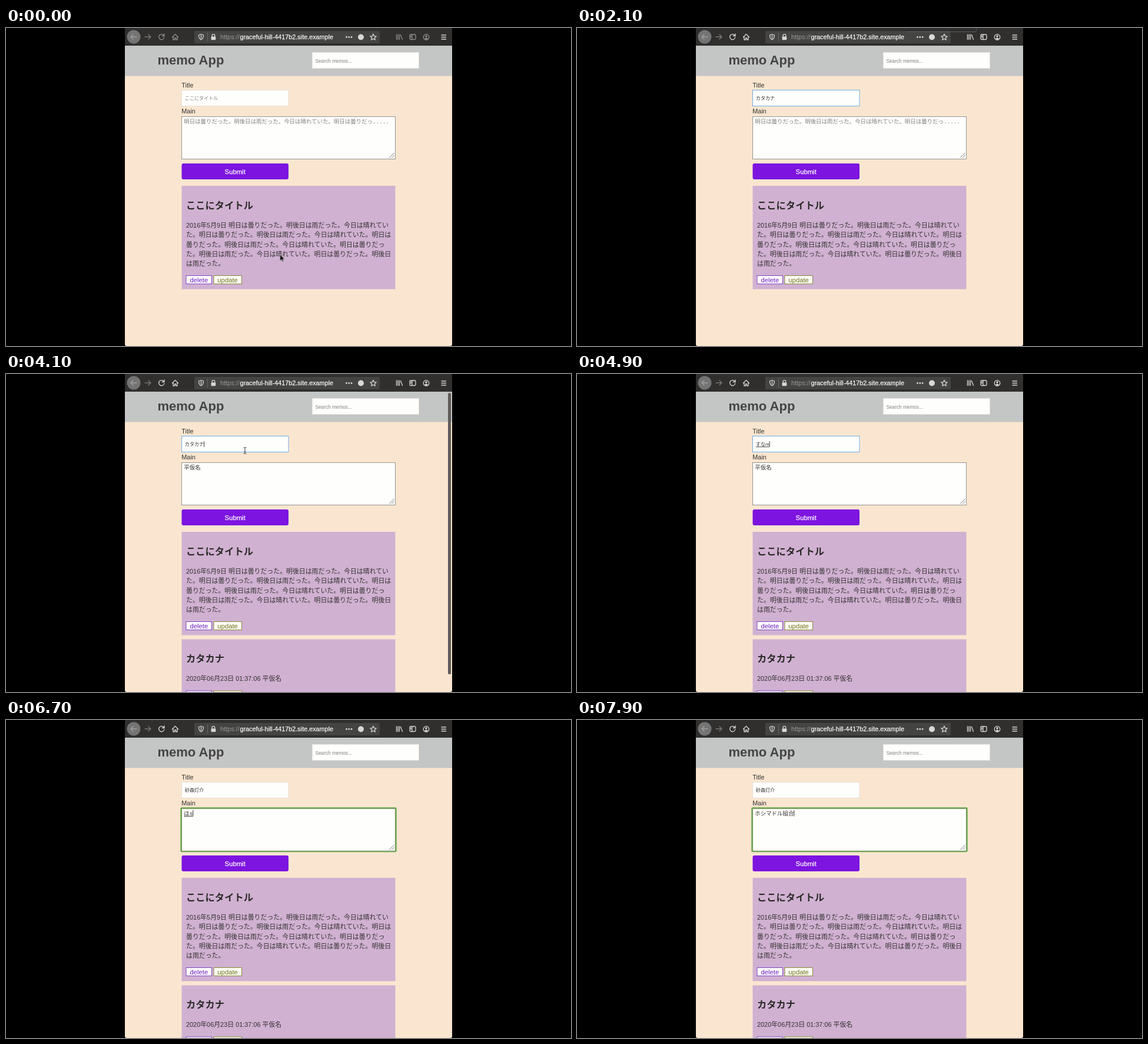
Recreate the animation shown at these times as an HTML page. Size 960x540 px, loop 8000 ms.

```html
<!DOCTYPE html>
<html lang="ja">
<head>
<meta charset="utf-8">
<title>memo App</title>
<style>
html, body { margin: 0; width: 100%; height: 100%; overflow: hidden; background: #000; }
svg { display: block; width: 960px; height: 540px; }
text { font-family: "Liberation Sans", "Noto Sans CJK JP", sans-serif; font-size: 10.9px; fill: #333130; white-space: pre; }
.bold { font-weight: 700; fill: #2c2a28; font-size: 16.3px; }
.small { font-size: 8.1px; }
.mono { font-family: "Liberation Mono", "Noto Sans CJK JP", monospace; font-size: 9.45px; }
.hint { fill: #80807c; }
.mid { text-anchor: middle; font-size: 11.3px; }
.icons { fill: none; stroke: #d8d8d8; stroke-width: 1.3; stroke-linecap: round; stroke-linejoin: round; }
.solid { fill: #d8d8d8; stroke: none; }

#wake { animation: wake 8s infinite step-end; }
@keyframes wake { 0% { opacity: .55 } 7.5%, 100% { opacity: 1 } }

#popup { animation: popup 8s infinite step-end; }
@keyframes popup { 0% { opacity: 0 } 23.75% { opacity: 1 } 28.75%, 100% { opacity: 0 } }

#added { animation: added 8s infinite step-end; }
@keyframes added { 0% { opacity: 0 } 45%, 100% { opacity: 1 } }

#bar { animation: bar 8s infinite linear; }
@keyframes bar { 0%, 44.99% { opacity: 0 } 45%, 56% { opacity: 1 } 59%, 100% { opacity: 0 } }

#pointer { animation: move 8s infinite ease-in-out; }
@keyframes move {
  0%, 1.5% { transform: translate(465.5px, 384.5px) }
  6.5%, 11% { transform: translate(400px, 121px) }
  37.5% { transform: translate(448px, 121px); animation-timing-function: linear }
  40% { transform: translate(438.5px, 138px) }
  43.5%, 46% { transform: translate(405px, 244px) }
  51%, 100% { transform: translate(406px, 130px) }
}
#arrow { animation: arrow 8s infinite step-end; }
@keyframes arrow { 0% { opacity: 1 } 5.5% { opacity: 0 } 41.5% { opacity: 1 } 50%, 100% { opacity: 0 } }
#beam { animation: beam 8s infinite step-end; }
@keyframes beam {
  0% { opacity: 0 } 5.5% { opacity: 1 } 10% { opacity: 0 }
  37.5% { opacity: 1 } 41.5% { opacity: 0 } 50% { opacity: 1 } 56.25%, 100% { opacity: 0 }
}
</style>
</head>
<body>
<svg viewBox="0 0 960 540">
  <defs>
    <g id="buttons">
      <rect x="306" y="420.5" width="43.5" height="14" fill="#fdfcfd" stroke="#8446c4"/>
      <text class="mid" x="327.8" y="431.8" style="fill:#6f22c0">delete</text>
      <rect x="353" y="420.5" width="47.5" height="14" fill="#fdfdf6" stroke="#8a8c38"/>
      <text class="mid" x="376.6" y="431.8" style="fill:#70741c">update</text>
    </g>
  </defs>

  <path d="M202 0H758V537a3 3 0 0 1-3 3H205a3 3 0 0 1-3-3z" fill="#fae6d0"/>

  <!-- browser bar -->
  <rect x="202" width="556" height="30" fill="#302f2e"/>
  <rect x="320" y="5" width="315" height="21" rx="2" fill="#444443"/>
  <circle cx="217" cy="15" r="11.5" fill="#747474"/>
  <g class="icons">
    <path d="M222 15H212M216 11l-4 4 4 4" stroke="#a0a0a0"/>
    <path d="M236 15H246M242 11l4 4-4 4" stroke="#7a7a7a"/>
    <g id="wake">
      <path d="M268 12.5a4.6 4.6 0 1 0 .8 3.5M269 10v3.5h-3.5"/>
      <path d="M282.5 15.5l5-5 5 5M284 15v5h2.5v-3h2v3h2.5v-5"/>
      <path d="M663.5 11v8.5M666 11v8.5M668.5 11v8.5M670.5 11.5l3 8"/>
      <rect x="686" y="11" width="10" height="8.5" rx="1.5"/><path d="M690 11v8.5M687.5 13.5h1M687.5 15.5h1"/>
      <circle cx="714" cy="15.5" r="4.8"/>
      <circle class="solid" cx="714" cy="14" r="1.8"/><path class="solid" d="M711 18.5q3-4 6 0l-3 1.5z"/>
    </g>
    <path d="M331.5 10.5l4 1.5q0 6-4 8-4-2-4-8zM331.5 12.5v5"/>
    <path d="M342.5 8v15" stroke="#666" stroke-width="1"/>
    <path d="M350 15v-2a2.4 2.4 0 0 1 4.8 0v2"/>
    <rect class="solid" x="348.5" y="14.5" width="7.8" height="5.8" rx="1"/>
    <path d="M624 10.3l1.5 3.4 3.7.4-2.8 2.5.8 3.6-3.2-1.9-3.2 1.9.8-3.6-2.8-2.5 3.7-.4z"/>
    <path d="M740 12h7.5M740 15.5h7.5M740 19h7.5"/>
  </g>
  <g class="solid">
    <circle cx="578.5" cy="15.5" r="1.4"/><circle cx="582.8" cy="15.5" r="1.4"/><circle cx="587.1" cy="15.5" r="1.4"/>
    <circle cx="603" cy="15.5" r="5"/>
  </g>
  <text x="364" y="19.3" style="fill:#9a9a9a">https://</text>
  <text x="397.5" y="19.3" style="fill:#f8f8f8;font-size:10.8px;stroke:#f8f8f8;stroke-width:.25px">graceful-hill-4417b2.site.example</text>
  <path id="popup" d="M555 -1q2 1 6 1M678.5 -1v5q0 2.5-2.5 2.5H561" fill="none" stroke="#585858"/>

  <!-- page header -->
  <rect x="202" y="30" width="556" height="51.5" fill="#c4c5c5"/>
  <text class="bold" x="257.5" y="62" style="font-size:22px;fill:#444443">memo App</text>
  <rect x="520.5" y="41.5" width="181" height="27" fill="#fefefc" stroke="#e6e4da"/>
  <text class="hint" x="525.5" y="58.6" style="font-size:8.25px">Search memos...</text>

  <!-- form -->
  <text x="298.3" y="100.7">Title</text>
  <rect id="titleBox" x="298.5" y="105.5" width="181.5" height="27" fill="#fefefc"/>
  <text x="298.3" y="144.7">Main</text>
  <rect id="mainGlow" x="297.5" y="149.5" width="365" height="73.5" rx="1.5" fill="none" stroke="#84b668" stroke-width="3"/>
  <rect id="mainBox" x="298.5" y="150.5" width="363" height="72" fill="#fefefc"/>
  <path d="M651 220.5l8.5-8.5M655 220.5l4.5-4.5" stroke="#777" fill="none"/>
  <rect id="mark" fill="#b5d3ef"/>
  <text id="titleText" class="small" x="303.8" y="122"></text>
  <text id="mainText" class="mono" x="302.3" y="161.7"></text>
  <path id="under" stroke="#333130" stroke-width=".9"/>
  <path id="caret" stroke="#222" stroke-width=".9"/>
  <rect x="298.5" y="230" width="181.5" height="27" rx="3" fill="#7d14e0"/>
  <text class="mid" x="389.2" y="247.8" style="fill:#fff;stroke:#fff;stroke-width:.25px">Submit</text>

  <!-- memos -->
  <rect x="298.5" y="268" width="363" height="175.5" fill="#d0b1d2"/>
  <text class="bold" x="306" y="306.7">ここにタイトル</text>
  <g id="body"></g>
  <use href="#buttons"/>
  <g id="added">
    <rect x="298.5" y="450.5" width="363" height="90" fill="#d0b1d2"/>
    <text class="bold" x="306" y="489.2">カタカナ</text>
    <text x="306" y="521.3">2020年06月23日 01:37:06 平仮名</text>
    <use href="#buttons" y="117.5"/>
  </g>
  <rect id="bar" x="751" y="32" width="5" height="478" rx="2.5" fill="#605c5a"/>

  <g id="pointer">
    <path id="arrow" d="M0 0V11.2L2.6 8.8 4.3 12.6 6.2 11.8 4.5 8.1H8z" fill="#0a0a0a" stroke="#e6dce6" stroke-width=".7"/>
    <path id="beam" d="M-2.5-5.5Q0-5.5 0-4 0-5.5 2.5-5.5M0-4V4M-2.5 5.5Q0 5.5 0 4 0 5.5 2.5 5.5M-1.2 2H1.2" fill="none" stroke="#444"/>
  </g>
</svg>
<script>
const $ = id => document.getElementById(id);
const cloudy = '明日は曇りだった。', rainy = '明後日は雨だった。', sunny = '今日は晴れていた。';
const weather = cloudy + rainy + sunny;
const memo = '2016年5月9日 ' + weather.repeat(4) + cloudy + rainy;

// break the memo into lines of the card's width
const breaks = [0, 35, 67, 98, 130, memo.length];
breaks.slice(1).forEach((end, i) => {
  const line = document.createElementNS('http://www.w3.org/2000/svg', 'text');
  line.setAttribute('x', 306);
  line.setAttribute('y', 339 + i * 16.35);
  line.textContent = memo.slice(breaks[i], end);
  $('body').append(line);
});

const fields = {
  title: { hint: 'ここにタイトル', x: 303.8, y: 119, h: 9.5 },
  main: { hint: weather + '明日は曇りだっ.....', x: 302.3, y: 158.3, h: 10.5 }
};

// one step per key; the text stays underlined until the last step commits it
function type(start, gap, focus, keys) {
  const list = keys.split(' ');
  const steps = list.map((text, i) => ({ at: start + i * gap, focus, text, composing: true }));
  return [...steps, { at: start + list.length * gap, focus, text: list[list.length - 1] }];
}

const steps = [
  { at: 0 },
  { at: 500, focus: 'title', text: '' },
  ...type(800, 100, 'title', 'k か かt かた かたk かたか かたかn カタカナ'),
  ...type(2220, 60, 'main', 'h ひ ひr ひら ひらg ひらが ひらがn 平仮名'),
  { at: 3600 },
  { at: 3900, focus: 'title', text: 'カタカナ' },
  { at: 4300, focus: 'title', text: 'カタカナ', selected: true },
  ...type(4500, 100, 'title', 's す すn すな すなm すなも すなもr 砂森 砂森t 砂森灯 砂森灯s 砂森灯す 砂森灯介'),
  { at: 6050, focus: 'main', text: '平仮名', selected: true },
  ...type(6450, 100, 'main', 'h ほ ほs ほし ほしm ほしま ほしまd ほしまど ほしまどr ホシマドル ホシマドルく ホシマドル組 ホシマドル組合')
];

function set(id, attrs) {
  for (const name in attrs) $(id).setAttribute(name, attrs[name]);
}

function draw() {
  const t = performance.now() % 8000;
  const past = steps.filter(s => s.at <= t);
  const { at, focus, text, composing, selected } = past[past.length - 1];

  for (const name in fields) {
    const last = past.filter(s => s.focus === name).pop();
    const value = last ? last.text : '';
    const node = $(name + 'Text');
    node.textContent = value || fields[name].hint;
    node.classList.toggle('hint', !value);
  }

  set('titleBox', { stroke: focus === 'title' ? '#72aee8' : '#e8e0d8' });
  set('mainBox', { stroke: focus === 'main' ? '#648a4c' : '#949490' });
  set('mainGlow', { opacity: focus === 'main' ? 1 : 0 });

  let caret = '', under = '', markWidth = 0;
  if (focus) {
    const { x, y, h } = fields[focus];
    const width = text ? $(focus + 'Text').getComputedTextLength() : 0;
    if (selected) markWidth = width;
    else if ((t - at) % 1000 < 500) caret = `M${x + width + .4} ${y - h / 2}v${h}`;
    if (composing) under = `M${x} ${y + h / 2}h${width}`;
    set('mark', { x, y: y - h / 2 - .5, height: h + 1 });
  }
  set('mark', { width: markWidth });
  set('caret', { d: caret });
  set('under', { d: under });
  requestAnimationFrame(draw);
}
draw();
</script>
</body>
</html>
```
